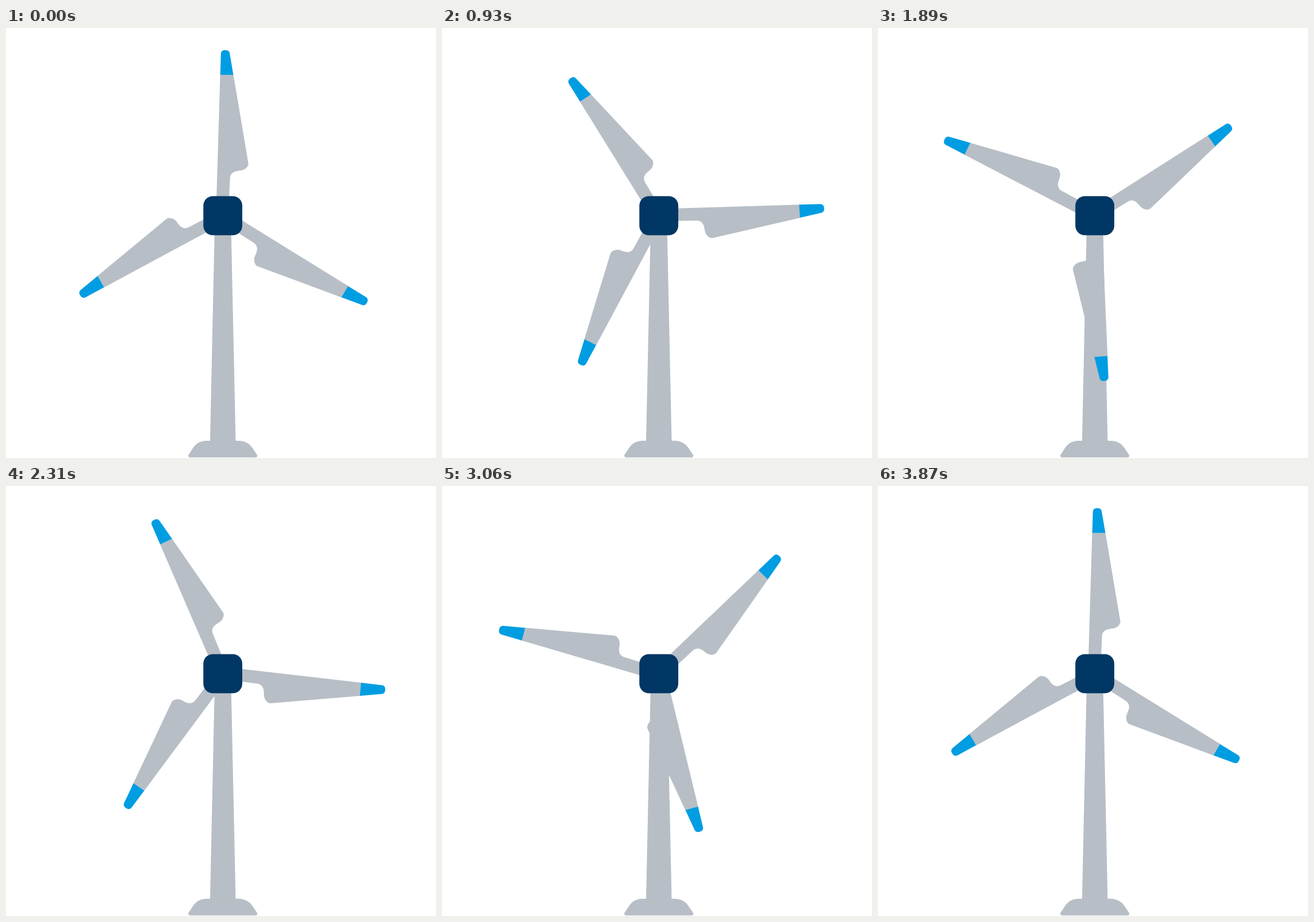
Animation of 748x748 px, one loop 3.9 s. Source, as an HTML page:

```html
<!DOCTYPE html>
<html lang="en">
<head>
<meta charset="utf-8">
<title>Wind turbine</title>
<style>
  html, body { margin: 0; width: 100%; height: 100%; overflow: hidden; background: #fff; }
  svg { display: block; width: 100%; height: 100%; }
  .steel { fill: #b7bec6; }
  .tip { fill: #009de2; }
  .hub { fill: #003764; }
</style>
</head>
<body>
<svg viewBox="0 0 748 748">
  <defs>
    <!-- Blade pointing up, hub centre at 0,0 -->
    <g id="blade">
      <path class="steel" d="M-4.4 -246 L18.4 -246 L44.5 -91.5 C45.2 -86.5 40.5 -81.5 35 -79.4 C31.5 -78.2 27 -78.4 23 -77.3 C17 -75.7 12.9 -72 12.6 -65 L11.2 -34 L10.5 -14 L-11.3 -14 Z"/>
      <path class="tip" d="M-4.3 -245 L-3.2 -281.5 C-3 -286 0 -288 4.5 -288 C8.5 -288 11.4 -286.5 12.1 -282.5 L18.5 -245 Z"/>
    </g>
  </defs>
  <path class="steel" d="M362.9 350 L391.6 350 L399.5 718 L405 718 C415 718 424 723 429 731 L436.5 742 C438.5 745 436.5 747 434 747 L320.5 747 C317.5 747 316 744.5 317.8 742 L325 731 C330 723 338.500 718 348 718 L355 718 Z"/>
  <g transform="translate(377 326.5)">
    <g id="rotor">
      <use href="#blade"/>
      <use href="#blade" transform="translate(3.7 3.6) rotate(120)"/>
      <use href="#blade" transform="translate(3.6 -1.6) rotate(240)"/>
    </g>
    <rect class="hub" x="-33.700" y="-34" width="67.700" height="68" rx="16.500"/>
  </g>
</svg>
<script>
  const STEP = 30, STEPS = 130;
  const rotor = document.getElementById('rotor');
  const start = performance.now();

  // One full turn; the last step repeats the first pose.
  function draw(now) {
    const step = Math.floor(Math.max(0, now - start) / STEP) % STEPS;
    rotor.setAttribute('transform', `rotate(${360 * step / (STEPS - 1)})`);
    requestAnimationFrame(draw);
  }
  draw(start);
</script>
</body>
</html>
```
